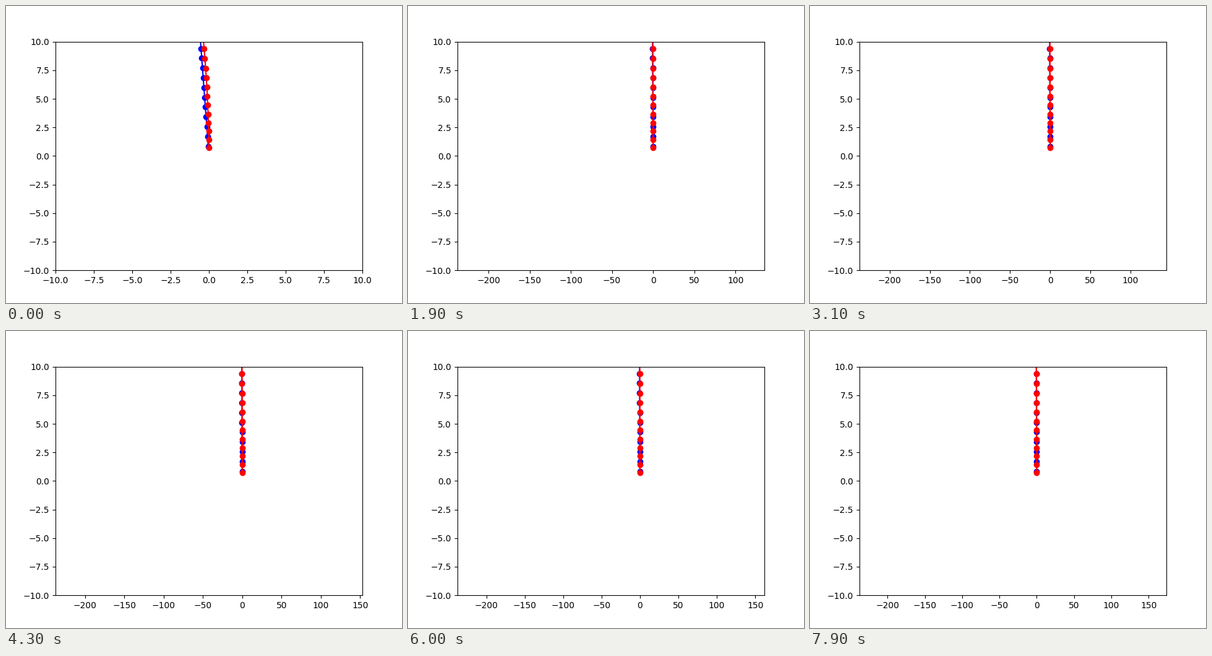
A matplotlib script for the animation above (8 s loop, 640 by 480 pixels).

```python
import numpy as np
import matplotlib.pyplot as plt
from matplotlib.animation import FuncAnimation

FRAMES, INTERVAL = 80, 100
HOLD = 5            # frames before the x range jumps out
LEFT = -237.6

# right edge of the x range at a few frames, joined by a smooth curve
KEYS = np.array([5, 13, 19, 31, 43, 60, 72, 79])
EDGE = np.array([122, 129.8, 135.23, 144.86, 152.85, 161.97, 169.12, 173.9])
SLOPE = np.gradient(EDGE, KEYS)


def right_edge(n):
    """Cubic Hermite interpolation of the right x limit."""
    i = min(np.searchsorted(KEYS, n, side="right") - 1, len(KEYS) - 2)
    h = KEYS[i + 1] - KEYS[i]
    s = (n - KEYS[i]) / h
    return ((1 + 2 * s) * (1 - s) ** 2 * EDGE[i]
            + s * (1 - s) ** 2 * h * SLOPE[i]
            + s * s * (3 - 2 * s) * EDGE[i + 1]
            + s * s * (s - 1) * h * SLOPE[i + 1])


fig, ax = plt.subplots(figsize=(6.4, 4.8), dpi=100)
k = np.arange(1, 17)
ax.plot(-0.047 * k, 0.855 * k, "bo-")
ax.plot(-0.00217 * k**2, 0.7 * k + 0.0067 * k**2, "ro-")
ax.set_ylim(-10, 10)


def update(n):
    if n < HOLD:
        ax.set_xlim(-10, 10)
    else:
        ax.set_xlim(LEFT, right_edge(n))
    return ax.lines


anim = FuncAnimation(fig, update, frames=FRAMES, interval=INTERVAL,
                     init_func=lambda: update(0), repeat=True, repeat_delay=0)
plt.show()
```
